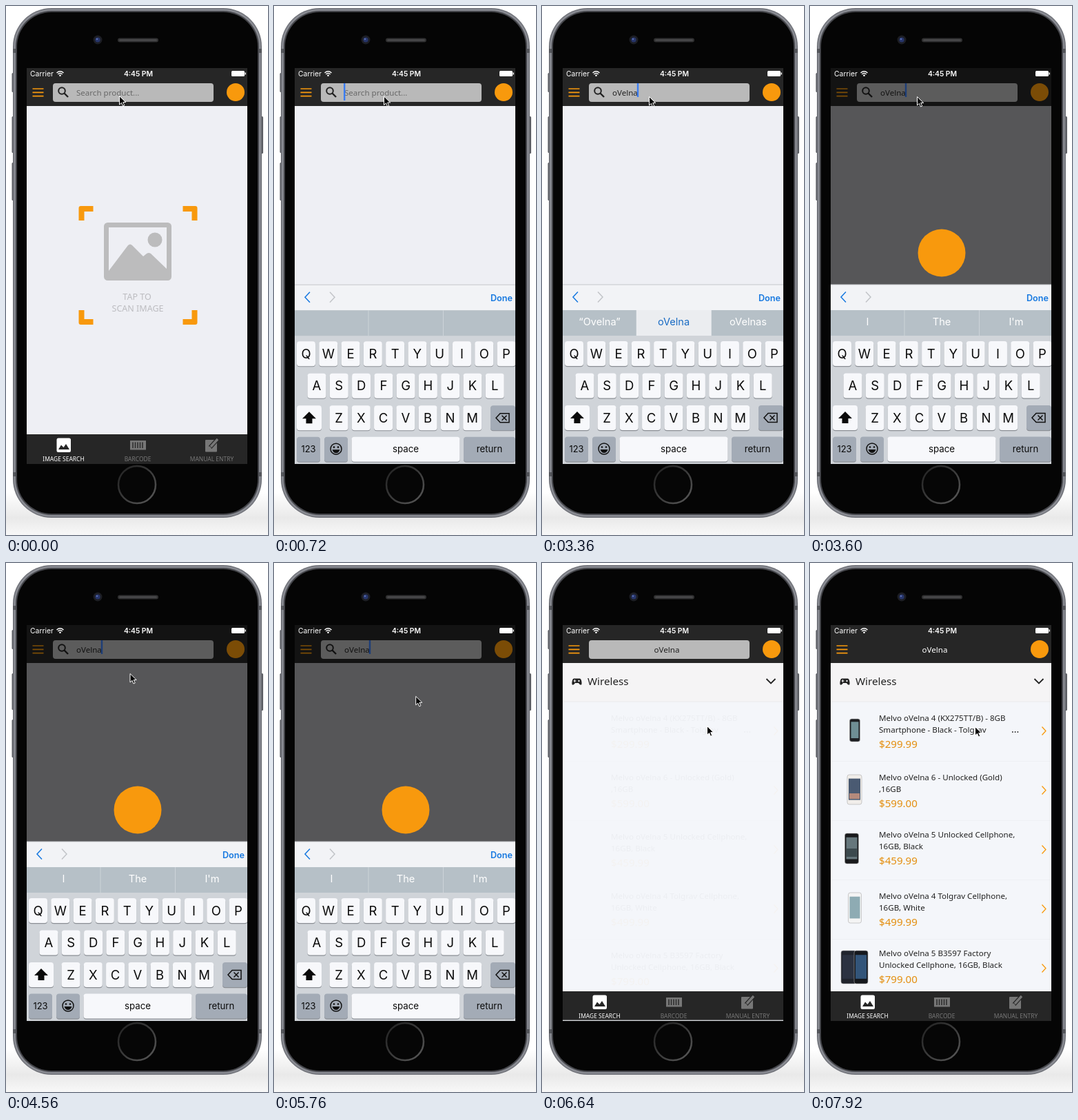
Write an HTML page that moves like this. It is 380 by 767 pixels and loops after 8 s.

```html
<!DOCTYPE html>
<html lang="en">
<head>
<meta charset="utf-8">
<title>Product search</title>
<style>
html, body { margin: 0; width: 100%; height: 100%; overflow: hidden; background: #fff; }
svg { display: block; width: 100vw; height: 100vh; }
text { font-family: "Noto Sans", "Open Sans", sans-serif; white-space: pre; }
.ios { font-family: Inter, Roboto, sans-serif; }
</style>
</head>
<body>
<svg id="stage" viewBox="0 0 380 767"></svg>
<script>
const ORANGE = '#f8990d', DARK = '#262626', PAGE = '#eeeff4';
const WORD = 'oVelna';

const rect = (x, y, w, h, fill, extra = '') =>
  `<rect x="${x}" y="${y}" width="${w}" height="${h}" fill="${fill}" ${extra}/>`;
const circle = (x, y, r, fill, extra = '') =>
  `<circle cx="${x}" cy="${y}" r="${r}" fill="${fill}" ${extra}/>`;
const text = (x, y, s, size, fill, extra = '') =>
  `<text x="${x}" y="${y}" font-size="${size}" fill="${fill}" ${extra}>${s}</text>`;
const line = (d, stroke, width, extra = '') =>
  `<path d="${d}" fill="none" stroke="${stroke}" stroke-width="${width}" ${extra}/>`;
const shape = (d, fill, extra = '') => `<path d="${d}" fill="${fill}" ${extra}/>`;
const group = (id, body, extra = '') => `<g id="${id}" ${extra}>${body}</g>`;
const MID = 'text-anchor="middle"';
const IOS = 'class="ios"';

function phone() {
  const side = (x, y, h) => rect(x, y, 5, h, '#5d5f65', 'rx="1.5"');
  return `<defs>
    <linearGradient id="floor" x1="0" y1="0" x2="0" y2="1">
      <stop offset="0" stop-color="#fff"/><stop offset=".6" stop-color="#e9e9e9"/>
      <stop offset="1" stop-color="#f8f8f8"/></linearGradient>
    <linearGradient id="ring" x1="0" y1="0" x2="1" y2="1">
      <stop offset="0" stop-color="#222"/><stop offset=".5" stop-color="#3a3a3a"/>
      <stop offset="1" stop-color="#5a5a5a"/></linearGradient>
    <clipPath id="screen"><rect x="30" y="90" width="320" height="574"/></clipPath>
  </defs>`
    + rect(0, 705, 380, 62, 'url(#floor)')
    + side(8.5, 97, 28) + side(8.5, 160, 53) + side(8.5, 227, 55) + side(368, 160, 54)
    + rect(10, 3, 361, 739, '#6d6f76', 'rx="56"')
    + rect(11.5, 4.5, 358, 736, '#898b92', 'rx="54"')
    + rect(10, 62, 361, 6, '#55575c') + rect(10, 676, 361, 6, '#55575c')
    + rect(14, 7, 353, 731, '#45464b', 'rx="52"')
    + rect(16, 9, 349, 727, '#050505', 'rx="50"')
    + circle(133, 49, 6.5, '#1d1e24') + circle(133, 49, 3.6, '#27356b') + circle(132, 48, 1.3, '#5a6fb0')
    + rect(162, 46.5, 59, 6, '#2f2f30', 'rx="3"') + rect(164, 48, 55, 3, '#454547', 'rx="1.5"')
    + circle(190, 694, 27, '#060606', 'stroke="url(#ring)" stroke-width="2.5"');
}

function scanPrompt() {
  const corner = (x, y, sx, sy) =>
    shape('M0 21V3Q0 0 3 0H21V8H8V21Z', ORANGE, `transform="translate(${x} ${y}) scale(${sx} ${sy})"`);
  const grey = '#bcbcbd';
  return corner(105.5, 290, 1, 1) + corner(277.5, 290, -1, 1)
    + corner(105.5, 462, 1, -1) + corner(277.5, 462, -1, -1)
    + rect(145.5, 317.5, 91, 77, 'none', `rx="2" stroke="${grey}" stroke-width="7"`)
    + circle(216, 339, 10.5, grey)
    + shape('M149 393V384L177 347Q180 344 183 347L199 363L204 359Q207 357 210 359L235 383V393Z', grey)
    + text(190, 426, 'TAP TO', 12.5, '#bcbcc0', MID)
    + text(191, 443, 'SCAN IMAGE', 12.5, '#bcbcc0', MID);
}

function header() {
  return rect(30, 90, 320, 55, DARK)
    + line('M38.5 120H54.5M38.5 125.3H54.5M38.5 130.6H54.5', ORANGE, 1.7)
    + group('box', rect(68, 112, 233, 27, '#b9b9b9', 'rx="4"'))
    + group('lens', circle(81, 123, 4.8, 'none', 'stroke="#222" stroke-width="2"')
      + line('M84.5 126.5L90 132', '#222', 2.4))
    + text(102, 130, '', 11.56, '#222', 'id="query"')
    + rect(101, 112, 2.4, 25, '#3b7df2', 'id="caret"')
    + circle(333, 125, 13, ORANGE);
}

function tabs() {
  const grey = '#777';
  const bars = [184, 187.5, 191, 194.5, 198].map(x => `M${x} 632.5V641`).join('');
  const label = (x, s, fill) => text(x, 659.5, s, 8.45, fill, MID);
  return rect(30, 621, 320, 43, DARK)
    + rect(73.5, 626.5, 20.5, 20.5, '#fff', 'rx="2.5"')
    + shape('M76 643L80 636.5L83.5 640L87 635L92 643Z', DARK)
    + rect(180, 630, 23, 13.5, grey) + line(bars, DARK, 1.4)
    + rect(289, 629, 17, 17.5, grey, 'rx="1"')
    + line('M296 640L306 629', DARK, 6) + line('M297 639L307 628', grey, 3.4)
    + shape('M294 642L295 638L298 641Z', grey)
    + label(83.5, 'IMAGE SEARCH', '#fff') + label(191, 'BARCODE', grey) + label(298.5, 'MANUAL ENTRY', grey);
}

const products = [
  ['Melvo oVelna 4 (KX275TT/B) - 8GB', 'Smartphone - Black - Tolgrav', '$299.99'],
  ['Melvo oVelna 6 - Unlocked (Gold)', ',16GB', '$599.00'],
  ['Melvo oVelna 5 Unlocked Cellphone,', '16GB, Black', '$459.99'],
  ['Melvo oVelna 4 Tolgrav Cellphone,', '16GB, White', '$499.99'],
  ['Melvo oVelna 5 B3597 Factory', 'Unlocked Cellphone, 16GB, Black', '$799.00'],
];

function thumbs() {
  const one = (x, y, w, h, body, glass) =>
    rect(x, y, w, h, body, 'rx="3" stroke="#aaa" stroke-width=".6"')
    + rect(x + 2, y + h * .13, w - 4, h * .72, glass);
  return one(57.5, 226, 15, 33, '#1d1f22', '#6f8f95')
    + one(54, 307, 21, 43, '#f1eeea', '#4a5a72') + rect(57, 334, 15, 8, '#b58a7c')
    + one(50.5, 392, 20, 44, '#191a1c', '#66777c') + rect(53, 414, 15, 12, '#3c4a4e')
    + one(55.5, 478, 19, 44, '#f4f4f4', '#8eabb3')
    + one(45, 562, 22, 48, '#20242d', '#2b3241') + one(64, 562, 20, 48, '#15181d', '#33557a');
}

function results() {
  const rows = products.map(([a, b, price], i) => {
    const y = 229 + 86 * i;
    return group('row' + i, text(100, y, a, 11.58, '#222') + text(100, y + 17, b, 11.58, '#222')
      + text(100, y + 39, price, 15.1, '#e48f10'))
      + line(`M336.5 ${y + 8.5}L342 ${y + 14.5}L336.5 ${y + 20.5}`, ORANGE, 1.3)
      + rect(30, y + 58, 320, 1, '#eef0f4');
  }).join('');
  return rect(30, 145, 320, 476, '#f4f6fa') + rect(30, 145, 320, 56, '#f5f4f5') + rect(30, 200.5, 320, 1, '#ecebee')
    + shape('M46 167.5H55Q58 169 57.5 176Q55.5 178 53 174H48Q45.5 178 43.5 176Q43 169 46 167.5Z', '#222')
    + line('M45.5 171H49.5M47.5 169V173', '#f5f4f5', 1) + circle(53.5, 171, 1.2, '#f5f4f5')
    + text(66, 177, 'Wireless', 15.2, '#222')
    + line('M325.5 168L332 174.5L338.5 168', '#222', 1.8)
    + group('list', rows + text(292, 246, '...', 14, '#222') + group('thumbs', thumbs()));
}

function keyboard() {
  const key = (x, y, w, s, dark, size = 18.5) =>
    rect(x, y + 1.2, w, 36, '#8b8f95', 'rx="4"') + rect(x, y, w, 36, dark ? '#a3abb6' : '#f7f8fb', 'rx="4"')
    + text(x + w / 2, y + 18 + size * .36, s, size, '#0a0a0a', `${IOS} ${MID}`);
  const row = (letters, center, y) =>
    [...letters].map((c, i) => key(center + i * 32.28 - 13.5, y, 27, c)).join('');
  const slots = [83.5, 191, 299].map((x, i) =>
    text(x, 463, '', 14.6, '#fff', `${IOS} ${MID} id="hint${i}"`)).join('');
  return rect(30, 404, 320, 260, '#d0d4d9') + rect(30, 404, 320, 38, '#f2f3f6') + rect(30, 403.5, 320, 1, '#c6c8cc')
    + line('M52 414.5L45 422L52 429.5', '#1678e0', 1.5) + line('M81 414.5L88 422L81 429.5', '#c2c4c8', 1.5)
    + text(314, 427.5, 'Done', 12.6, '#1678e0', `${IOS} font-weight="600"`)
    + rect(30, 441, 320, 37, '#b6c0c7') + rect(136.5, 441, 1, 37, '#ccd3d8') + rect(245, 441, 1, 37, '#ccd3d8')
    + rect(137, 441, 108.5, 37, '#ebedf0', 'id="pick"') + slots
    + row('QWERTYUIOP', 46.5, 486) + row('ASDFGHJKL', 62, 532.5) + row('ZXCVBNM', 94, 579)
    + key(33, 579, 36, '') + shape('M51 588L61 598H55.5V605H46.5V598H41Z', '#0a0a0a')
    + key(314, 579, 36, '', true)
    + line('M328 590.5H341V603.5H328L322 597Z', '#111', 1.5) + line('M330.5 593.5L337.5 600.5M337.5 593.5L330.5 600.5', '#111', 1.5)
    + key(33, 624.5, 34, '123', true, 13) + key(73, 624.5, 34, '', true)
    + circle(90, 642, 8, 'none', 'stroke="#111" stroke-width="1.5"')
    + circle(87, 639.5, 1.3, '#111') + circle(93, 639.5, 1.3, '#111') + shape('M84.5 643H95.5Q94 648 90 648Q86 648 84.5 643Z', '#111')
    + key(112.5, 624.5, 157, 'space', false, 13.3) + key(275, 624.5, 75, 'return', true, 13.2);
}

function statusBar() {
  return text(35, 102, 'Carrier', 10.4, '#fff', IOS)
    + line('M73.5 97Q78.5 92.5 83.5 97M75.3 99Q78.5 96 81.7 99', '#fff', 1.4) + circle(78.5, 100.8, 1.3, '#fff')
    + text(192, 102, '4:45 PM', 10.3, '#fff', `${IOS} ${MID} font-weight="600"`)
    + rect(327, 94, 19, 8, '#fff', 'rx="1.5"') + rect(346.6, 96.5, 1.4, 3, '#fff');
}

const overlay = rect(30, 90, 320, 55, '#000', 'opacity=".5"') + rect(30, 145, 320, 476, '#000', 'opacity=".64"')
  + rect(30, 621, 320, 43, '#000', 'opacity=".5"') + circle(191, 358, 34.5, ORANGE)
  + text(191, 426, 'Searching similar products...', 16.33, ORANGE, MID);

document.getElementById('stage').innerHTML = phone() + group('app',
  rect(30, 90, 320, 574, PAGE) + group('scan', scanPrompt()) + group('results', results())
  + header() + tabs() + group('dim', overlay) + group('keys', keyboard()) + statusBar(),
  'clip-path="url(#screen)"')
  + group('mouse', shape('M0 0V12.5L3 9.8L5 14.5L7.2 13.5L5.2 9H9.2Z', '#000', 'stroke="#fff" stroke-width="1"'));

const el = Object.fromEntries([...document.querySelectorAll('[id]')].map(n => [n.id, n]));
const set = (id, name, value) => el[id].setAttribute(name, value);
const show = (id, alpha) => { set(id, 'opacity', +alpha); set(id, 'display', alpha > 0 ? 'inline' : 'none'); };
const ramp = (t, from, to) => Math.min(1, Math.max(0, (t - from) / (to - from)));
const settle = (t, from) => t < from ? 0 : 1 - Math.exp((from - t) / 65);

const FOCUS = 240, SUBMIT = 3440, BLUR = 6320, LOADED = 6560;
const keyTimes = [1360, 1680, 1920, 2160, 2400, 2640];
const path = [[160, 164.5, 130.5], [640, 159.5, 131], [2800, 159.5, 131], [3280, 155.5, 131.5], [3680, 155.5, 131.5],
  [4480, 180, 160.5], [5360, 180, 160.5], [6240, 239.5, 236.5], [8000, 239.5, 237.5]];

function mouseAt(t) {
  const i = path.findIndex(p => p[0] > t);
  if (i < 1) return path[0].slice(1);
  const a = path[i - 1], b = path[i], k = ramp(t, a[0], b[0]), s = k * k * (3 - 2 * k);
  return [a[1] + (b[1] - a[1]) * s, a[2] + (b[2] - a[2]) * s];
}

function hints(t, typed) {
  if (t < 1040) return ['', '', ''];
  if (!typed || t >= SUBMIT + 80) return ['I', 'The', "I'm"];
  const quoted = '“' + typed[0].toUpperCase() + typed.slice(1).toLowerCase() + '”';
  return typed.length < 4 ? [quoted, '', ''] : [quoted, WORD, WORD + 's'];
}

function draw(t) {
  const typed = WORD.slice(0, keyTimes.filter(k => k <= t).length);
  const loaded = t >= LOADED;

  show('scan', t < FOCUS + 80);
  set('keys', 'transform', `translate(0 ${261 * (1 - settle(t, FOCUS) + settle(t, BLUR))})`);
  show('dim', ramp(t, SUBMIT - 40, SUBMIT + 160) * (1 - ramp(t, 6520, 6620)));

  const fade = ramp(t, LOADED + 80, 7000);
  const ink = Math.round(34 + 221 * fade);
  show('box', 1 - fade);
  show('lens', !loaded);
  el.query.textContent = typed || 'Search product...';
  set('query', 'fill', typed ? `rgb(${ink},${ink},${ink})` : '#686868');
  set('query', 'x', loaded ? 181 : 102);
  set('query', 'text-anchor', loaded ? 'middle' : 'start');
  show('caret', t >= FOCUS && t < BLUR && (t - FOCUS) % 1000 < 550);
  set('caret', 'x', 101 + (typed ? el.query.getComputedTextLength() : 0));
  set('caret', 'height', typed ? 20 : 25);

  const words = hints(t, typed), picked = words[1] === WORD;
  words.forEach((w, i) => el['hint' + i].textContent = w);
  set('hint1', 'fill', picked ? '#1a6cc4' : '#fff');
  show('pick', picked);

  show('results', loaded);
  show('list', ramp(t, 6625, 7040));
  const pictures = t >= 6960;
  show('thumbs', pictures);
  for (const i of [2, 4]) set('row' + i, 'transform', `translate(0 ${pictures ? -3 : 0})`);

  set('mouse', 'transform', `translate(${mouseAt(t)})`);
}

function tick() {
  draw(Math.floor(performance.now() % 8000 / 80) * 80);
  requestAnimationFrame(tick);
}
tick();
</script>
</body>
</html>
```
